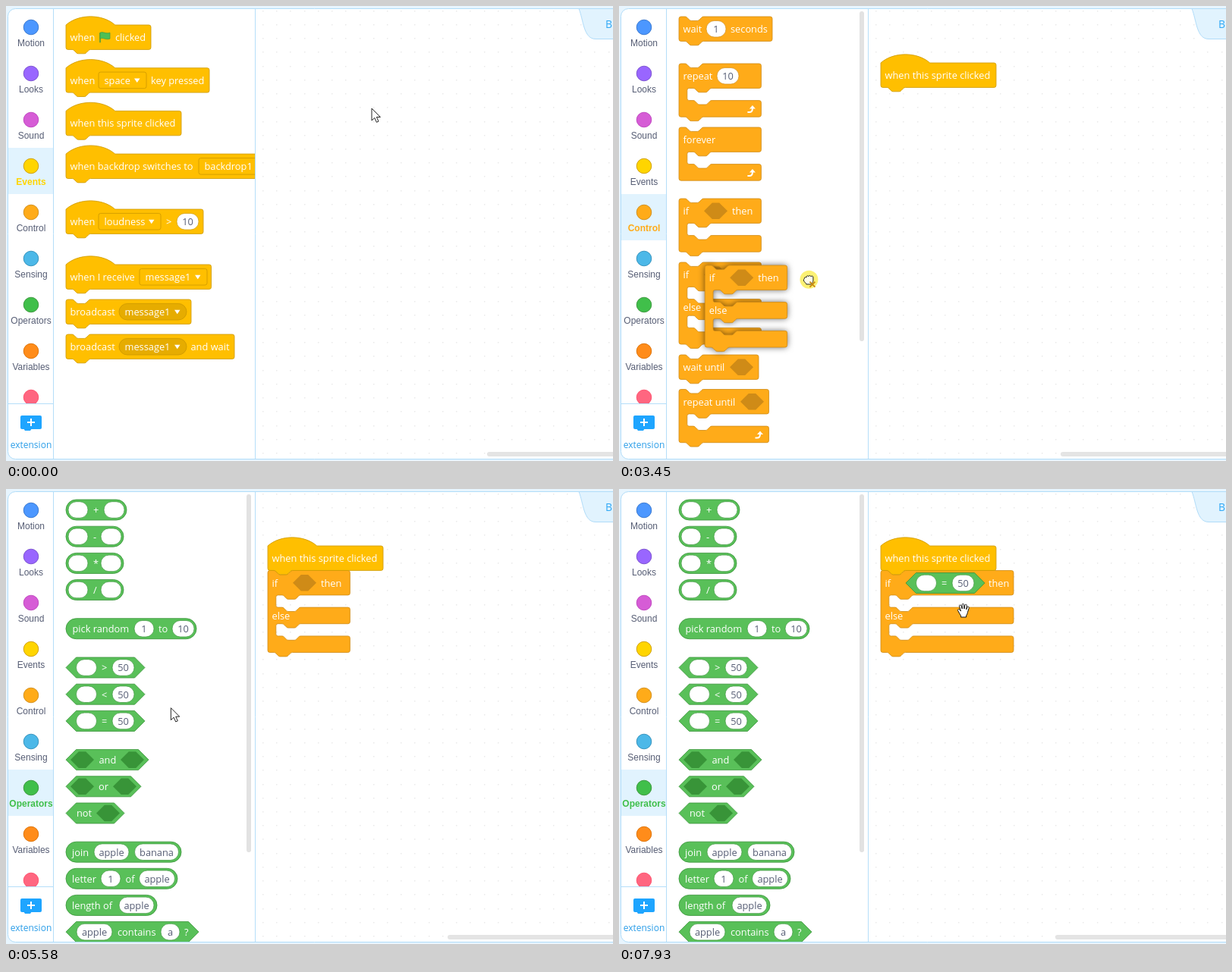
An HTML page with a canvas that plays this animation: 800 px wide and 600 px high, repeating every 8000 ms.

```html
<!DOCTYPE html>
<html lang="en">
<head>
<meta charset="utf-8">
<title>Block editor</title>
<style>
  html, body { margin: 0; width: 100%; height: 100%; overflow: hidden; }
  canvas { display: block; }
</style>
</head>
<body>
<canvas id="stage" width="800" height="600"></canvas>
<script>
const ctx = document.getElementById('stage').getContext('2d');
const LOOP = 8000, SCALE = 0.675, LAG = 104;
const BLOCK_FONT = '500 12.8px "Open Sans", "Noto Sans", sans-serif';

const EVENTS = { fill: '#FFBF00', edge: '#CC9900', slot: '#E6AC00' };
const CONTROL = { fill: '#FFAB19', edge: '#CF8B17', slot: '#CF8B17' };
const OPERATORS = { fill: '#59C059', edge: '#389438', slot: '#389438' };
const MARKER = { fill: '#C4C4C4', edge: '#C4C4C4' };

const CATEGORIES = [
  ['Motion', '#4C97FF', '#3373CC'], ['Looks', '#9966FF', '#774DCB'],
  ['Sound', '#D65CD6', '#BD42BD'], ['Events', '#FFD500', '#CC9900'],
  ['Control', '#FFAB19', '#CF8B17'], ['Sensing', '#4CB8E8', '#2E8EB8'],
  ['Operators', '#40BF4A', '#389438'], ['Variables', '#FF8C1A', '#DB6E00'],
  ['', '#FF6680', '#FF4D6A']
];

// ---- parts: [x, text, width, kind] relative to the block's left edge
const oval = (x, text, w) => [x, text, w, 'oval'];
const menu = (x, text, w) => [x, text, w, 'menu'];
const pill = (x, text, w) => [x, text, w, 'pill'];
const hex = x => [x, '', 31, 'hex'];
const label = text => [5.5, text];

const SPRITE_CLICKED = { theme: EVENTS, w: 152, hat: true, parts: [label('when this sprite clicked')] };
const IF_PARTS = [label('if'), hex(33), [70, 'then']];
const IF_ELSE = { theme: CONTROL, w: 108.4, mouths: 2, parts: IF_PARTS };
const compare = sign => ({ theme: OPERATORS, w: 104, shape: 'hex',
  parts: [oval(13.5, '', 27), [47, sign], oval(61, '50', 29)] });
const arithmetic = (sign, w = 76) => ({ w, shape: 'oval',
  parts: [oval(3, '', 26), [36, sign], oval(w - 30, '', 27)] });
const EQUALS = compare('=');

const PALETTES = {
  Events: { theme: EVENTS, blocks: [
    [25, { w: 112, hat: true, parts: [label('when'), [44, '', 14, 'flag'], [65, 'clicked']] }],
    [81.7, { w: 189, hat: true, parts: [label('when'), menu(43, 'space', 63), [112, 'key pressed']] }],
    [138.4, SPRITE_CLICKED],
    [195.1, { w: 290, hat: true, parts: [label('when backdrop switches to'), menu(175, 'backdrop1', 95)] }],
    [268, { w: 181, hat: true, parts: [label('when'), menu(43, 'loudness', 82), [132, '>'], oval(146, '10', 29)] }],
    [341, { w: 191.5, hat: true, parts: [label('when I receive'), menu(97, 'message1', 89)] }],
    [387, { w: 165, parts: [label('broadcast'), pill(70, 'message1', 89)] }],
    [433, { w: 222, parts: [label('broadcast'), pill(70, 'message1', 89), [164.5, 'and wait']] }]
  ] },
  Control: { theme: CONTROL, scrollEnd: 442, blocks: [
    [14, { w: 123, parts: [label('wait'), oval(36, '1', 26), [68, 'seconds']] }],
    [76, { w: 108.4, mouths: 1, loop: true, parts: [label('repeat'), oval(50, '10', 29)] }],
    [160, { w: 108.4, mouths: 1, loop: true, cap: true, parts: [label('forever')] }],
    [254, { w: 108.4, mouths: 1, parts: IF_PARTS }],
    [338, IF_ELSE],
    [460, { w: 105, parts: [label('wait until'), hex(67)] }],
    [505.5, { w: 118.5, mouths: 1, loop: true, parts: [label('repeat until'), hex(81)] }]
  ] },
  Operators: { theme: OPERATORS, scrollEnd: 479, blocks: [
    [14, arithmetic('+', 80)], [49.2, arithmetic('-')], [84.4, arithmetic('*')], [119.5, arithmetic('/')],
    [170.7, { w: 172, shape: 'oval', parts: [[8.5, 'pick random'], oval(90, '1', 26), [122, 'to'], oval(140, '10', 29)] }],
    [222, compare('>')], [257.2, compare('<')], [292.4, EQUALS],
    [343.6, { w: 109, shape: 'hex', parts: [hex(6), [43.5, 'and'], hex(72)] }],
    [378.8, { w: 99, shape: 'hex', parts: [hex(6), [43, 'or'], hex(62)] }],
    [414, { w: 77, shape: 'hex', parts: [[14, 'not'], hex(40)] }],
    [465.2, { w: 152, shape: 'oval', parts: [[8, 'join'], oval(37, 'apple', 46), oval(90.5, 'banana', 58)] }],
    [500.3, { w: 147, shape: 'oval', parts: [[8, 'letter'], oval(46, '1', 26), [78.5, 'of'], oval(96.5, 'apple', 47)] }],
    [535.4, { w: 120, shape: 'oval', parts: [[8, 'length of'], oval(70, 'apple', 46)] }],
    [570.6, { w: 175, shape: 'hex', parts: [oval(14, 'apple', 47), [68, 'contains'], oval(125, 'a', 25), [156, '?']] }]
  ] }
};

// ---- timeline
// Bursts of evenly spaced picture changes: first time, last time, count.
const BURSTS = [[180, 180, 1], [440, 1200, 10], [1300, 1850, 7], [2040, 2230, 3], [2410, 3180, 9],
  [3260, 4010, 9], [4110, 4110, 1], [4390, 4950, 8], [5130, 5130, 1], [5410, 5950, 7],
  [6140, 6890, 9], [6990, 7080, 2], [7360, 7390, 2], [7730, 7930, 3]];
const STEPS = [0, ...BURSTS.flatMap(([from, to, n]) =>
  Array.from({ length: n }, (_, i) => from + (n > 1 ? (to - from) * i / (n - 1) : 0)))];
const stepTime = t => STEPS.findLast(s => s <= t + 10);

const POINTER = [
  [0, 482, 135], [180, 432, 128], [440, 424, 125], [620, 350, 113], [900, 220, 205], [1050, 140, 190],
  [1200, 150, 159], [1300, 150, 159], [1390, 230, 150], [1500, 330, 125], [1654, 448, 99],
  [1850, 448, 99], [2126, 416, 96], [2410, 416, 96], [2650, 33, 275], [2760, 33, 275],
  [3090, 173, 357], [3260, 173, 357], [3343, 207, 361], [3447, 250, 361], [3634, 400, 235],
  [3900, 452, 172], [4110, 451, 172], [4390, 445, 155], [4526, 432, 132], [4740, 432, 132],
  [4880, 33, 394], [4950, 33, 394], [5130, 260, 275], [5410, 250, 280], [5950, 152, 306],
  [6140, 152, 306], [6223, 195, 311], [6327, 241, 309], [6420, 330, 270], [6600, 430, 205],
  [6786, 470, 168], [6890, 470, 168], [6976, 456, 132], [7080, 456, 132], [7280, 437, 123],
  [7730, 437, 124], [7930, 454, 160]
];
const CURSORS = [[0, 'arrow'], [1100, 'hand'], [1300, 'fist'], [2410, 'arrow'], [3080, 'hand'], [3260, 'delete'],
  [3600, 'fist'], [4600, 'hand'], [4800, 'arrow'], [5900, 'beam'], [7730, 'hand']];
const DRAGS = [
  { from: 1300, to: 2410, block: SPRITE_CLICKED, grab: [71, 21] },
  { from: 3260, to: 4740, block: IF_ELSE, grab: [94, 19] },
  { from: 6140, to: 7730, block: EQUALS, grab: [73, 14] }
];
const within = (t, ranges) => ranges.some(([a, b]) => t >= a && t < b);
const PRESSED = [[1300, 2400], [3260, 4600], [6140, 7700]];
const DIMMED = [[1380, 1560], [3500, 3600], [6250, 6450]];

function pointerAt(t) {
  const i = POINTER.findIndex(k => k[0] > t);
  if (i < 0) return POINTER.at(-1).slice(1);
  const [t0, x0, y0] = POINTER[i - 1], [t1, x1, y1] = POINTER[i];
  const p = (t - t0) / (t1 - t0);
  return [x0 + (x1 - x0) * p, y0 + (y1 - y0) * p];
}

// ---- drawing helpers
function paint(path, fill, stroke, width = 1) {
  if (fill) { ctx.fillStyle = fill; ctx.fill(path); }
  if (stroke) { ctx.strokeStyle = stroke; ctx.lineWidth = width; ctx.stroke(path); }
}
function text(s, x, y, color, font, align = 'left') {
  ctx.font = font; ctx.fillStyle = color; ctx.textAlign = align;
  ctx.fillText(s, x, y);
}
function at(x, y, draw) {
  ctx.save(); ctx.translate(x, y); draw(); ctx.restore();
}
function roundRect(x, y, w, h, r) {
  const p = new Path2D(); p.roundRect(x, y, w, h, r); return p;
}
function hexagon(x, y, w, h) {
  const r = h / 2;
  return new Path2D(`M${x},${y + r}l${r},${-r}h${w - h}l${r},${r}l${-r},${r}h${h - w}z`);
}
function circle(x, y, r) {
  const p = new Path2D(); p.arc(x, y, r, 0, 7); return p;
}

const NOTCH_RIGHT = 'c2,0 3,1 4,2l4,4c1,1 2,2 4,2h12c2,0 3,-1 4,-2l4,-4c1,-1 2,-2 4,-2';
const NOTCH_LEFT = 'c-2,0 -3,1 -4,2l-4,4c-1,1 -2,2 -4,2h-12c-2,0 -3,-1 -4,-2l-4,-4c-1,-1 -2,-2 -4,-2';
function stackPath({ w, hat, mouths = 0, cap }) {
  const width = w / SCALE;
  const top = hat ? 'M0,0c25,-22 71,-22 96,0' : `M0,4a4,4 0 0,1 4,-4H12${NOTCH_RIGHT}`;
  const arm = h => `H${width - 4}a4,4 0 0,1 4,4v${h - 8}a4,4 0 0,1 -4,4`;
  const mouth = `H64${NOTCH_LEFT}h-8a4,4 0 0,0 -4,4v16a4,4 0 0,0 4,4h8${NOTCH_RIGHT}` + arm(32);
  const units = new Path2D(top + arm(48) + mouth.repeat(mouths) +
    (cap ? '' : 'H48' + NOTCH_LEFT) + `H4a4,4 0 0,1 -4,-4${hat ? 'V0' : ''}z`);
  const path = new Path2D();
  path.addPath(units, new DOMMatrix().scale(SCALE));
  return path;
}

function drawPart([x, s, w, kind], cy, theme) {
  const top = cy - 10.8, base = cy + 4.8;
  if (!kind) return text(s, x, base, '#fff', BLOCK_FONT);
  if (kind === 'hex') return paint(hexagon(x, top, w, 21.6), theme.slot);
  if (kind === 'flag') {
    paint(new Path2D(`M${x + 1},${cy - 6}V${cy + 7}`), null, '#45993D', 1.5);
    return paint(new Path2D(`M${x + 1},${cy - 6}c4,-2 7,2 13,0v8c-6,2 -9,-2 -13,0z`), '#4CBF56', '#45993D', .7);
  }
  if (kind === 'oval') {
    paint(roundRect(x, top, w, 21.6, 10.8), '#fff', theme.edge, .7);
    return text(s, x + w / 2, base, '#575E75', BLOCK_FONT, 'center');
  }
  const isPill = kind === 'pill';
  paint(roundRect(x, top, w, 21.6, isPill ? 10.8 : 2.7), isPill ? theme.slot : theme.fill, theme.edge, .8);
  text(s, x + 7.5, base, '#fff', BLOCK_FONT);
  paint(new Path2D(`M${x + w - 16},${cy - 2.5}h7.5l-3.75,5.5z`), '#fff');
}

function drawBlock(block, x, y, theme = block.theme, lifted = false) {
  at(x, y, () => {
    const path = block.shape === 'hex' ? hexagon(0, 0, block.w, 27)
      : block.shape === 'oval' ? roundRect(0, 0, block.w, 27, 13.5) : stackPath(block);
    if (lifted) { ctx.shadowColor = 'rgba(0,0,0,.6)'; ctx.shadowBlur = 9; }
    paint(path, theme.fill);
    ctx.shadowColor = 'transparent';
    paint(path, null, theme.edge, .8);
    if (theme === MARKER) return;
    const cy = block.shape ? 13.5 : 16.2;
    block.parts.forEach(part => drawPart(part, cy, theme));
    if (block.mouths === 2) text('else', 5.5, 64, '#fff', BLOCK_FONT);
    if (block.loop) at(block.w - 13, 60, () => {
      paint(new Path2D('M-5,4h2.5q4,0 4,-5'), null, '#fff', 2);
      paint(new Path2D('M1.5,-5l4,4.5h-8z'), '#fff');
    });
  });
}

// ---- scene
function drawWorkspace(t) {
  ctx.fillStyle = '#E8F5FE';
  ctx.fillRect(0, 0, 800, 600);
  paint(roundRect(2.5, 3.5, 820, 594, 10), '#fff', '#B0DCF9');
  ctx.fillStyle = '#EAEAEA';
  for (let x = 338; x < 800; x += 18.225)
    for (let y = 24 - 18.225; y < 590; y += 18.225) ctx.fillRect(Math.round(x), Math.round(y), 1.5, 1.5);
  paint(new Path2D('M755,3.5C761,18 761,43.5 777,43.5H802V3.5z'), '#E1F3FE', '#B0DCF9');
  text('B', 790, 29, '#2FA8F5', '14px "Open Sans", sans-serif');
  paint(roundRect(t < 2410 ? 634 : t < 7730 ? 582 : 575, 588, 260, 6, 3), '#E4E4E4');
}

function drawPalette(selected) {
  const { theme, scrollEnd, blocks } = PALETTES[selected];
  ctx.save();
  ctx.beginPath(); ctx.rect(63, 4, 265, 593); ctx.clip();
  blocks.forEach(([y, block]) => drawBlock(block, 79, y, theme));
  if (scrollEnd) paint(roundRect(317, 7, 6, scrollEnd - 7, 3), '#E2E2E2');
  ctx.restore();
}

function drawCategories(selected) {
  ctx.save();
  ctx.beginPath(); ctx.rect(3, 4, 59, 520); ctx.clip();
  CATEGORIES.forEach(([name, color, edge], i) => {
    const y = 4 + 61 * i, active = name === selected;
    if (active) { ctx.fillStyle = '#E1F3FE'; ctx.fillRect(3, y, 59, 61); }
    paint(circle(33, y + 24, 9.8), color, edge, .9);
    text(name, 33, y + 49, active ? color : '#575E75',
      `${active ? 'bold ' : ''}12px "Liberation Sans", Arial, sans-serif`, 'center');
  });
  ctx.restore();
  paint(new Path2D('M62.5,4V597M328.5,4V597M3,524.5H62'), null, '#B5DEF9');
}

function drawExtension() {
  paint(roundRect(19, 540, 28, 18, 2), '#1EA5FF');
  paint(new Path2D('M23,557h11l-2,3h-7z'), '#1EA5FF');
  paint(new Path2D('M28,549h10M33,544v10'), null, '#fff', 2);
  text('extension', 33, 583, '#2A9DE8', '12px "Open Sans", "Noto Sans", sans-serif', 'center');
}

function drawScript(t) {
  if (t < 2410) return;
  const joined = t >= 7730;
  if (t >= 4740) {
    drawBlock(joined ? { ...IF_ELSE, w: 175, parts: [label('if'), [142, 'then']] } : IF_ELSE, 345, 107.5);
    if (joined) drawBlock(EQUALS, 378, 110.5);
    else if (t >= 7080) paint(hexagon(378, 113, 31, 21.6), null, '#fff', 2);
  } else if (t >= 4540) {
    drawBlock(IF_ELSE, 345, 107.5, MARKER);
  }
  drawBlock(SPRITE_CLICKED, 345, 75);
}

const HAND = new Path2D('M-7,1c-1.5,-2 1,-3.5 2.3,-1.5l1.2,1.6L-5.4,-5c-.5,-2.2 2,-2.8 2.6,-.6l1.1,3.6-.2,-5c0,-2.2 2.5,-2.2 2.6,0l.3,5 .8,-4.4c.4,-2.2 2.8,-1.7 2.6,.4l-.6,4.8 1,-2.6c.8,-1.8 3,-1 2.4,1l-1.6,5c-.6,2.6 -1,3.5 -2,4.8v2h-7v-1.8c-1.6,-2 -2.2,-4 -3.6,-6.2z');
const FIST = new Path2D('M-6,-1.5c0,-2 2,-2 2.5,-1c0,-3 2.6,-3 3,-1.4c.4,-2 2.8,-1.6 3,.2c.6,-1.6 3,-1.2 3,1v4c0,2 -1.5,3 -1.5,5h-7.5c0,-2 -3.5,-3 -3.5,-5q0,-1.6 1,-2.8z');
const ARROW = new Path2D('M0,0V16l3.8,-3.5 2.6,5.8 2.6,-1.2 -2.6,-5.6h5z');
const BEAM = new Path2D('M-3,-7h2l1,1 1,-1h2M0,-6V6M-3,7h2l1,-1 1,1h2');

function drawCursor(t) {
  const [x, y] = pointerAt(t);
  const kind = CURSORS.findLast(c => c[0] <= t)[1];
  at(x, y, () => {
    if (within(t, PRESSED)) paint(circle(0, 0, 12), 'rgba(250,235,50,.68)');
    if (kind === 'arrow') paint(ARROW, '#fff', '#222');
    else if (kind === 'beam') paint(BEAM, null, '#5B5220', 1.2);
    else if (kind === 'hand') paint(HAND, '#fff', '#111');
    else paint(FIST, '#FFFDE8', '#222');
    if (kind === 'delete') paint(new Path2D('M1,3l7,7M8,3l-7,7'), null, '#C98A10', 1.8);
  });
}

function draw(time) {
  const t = stepTime(time);
  const selected = t < 2760 ? 'Events' : t < 4950 ? 'Control' : 'Operators';
  drawWorkspace(t);
  drawScript(t);
  drawPalette(selected);
  drawCategories(selected);
  if (within(t, DIMMED)) { ctx.fillStyle = 'rgba(0,0,0,.185)'; ctx.fillRect(3, 4, 326, 593); }
  drawExtension();
  const drag = DRAGS.find(d => t >= d.from && t < d.to);
  if (drag) {
    const [x, y] = pointerAt(t - LAG);
    drawBlock(drag.block, x - drag.grab[0], y - drag.grab[1], drag.block.theme, true);
  }
  drawCursor(t);
}

const start = performance.now();
function tick() {
  draw((performance.now() - start) % LOOP);
  requestAnimationFrame(tick);
}
tick();
</script>
</body>
</html>
```
